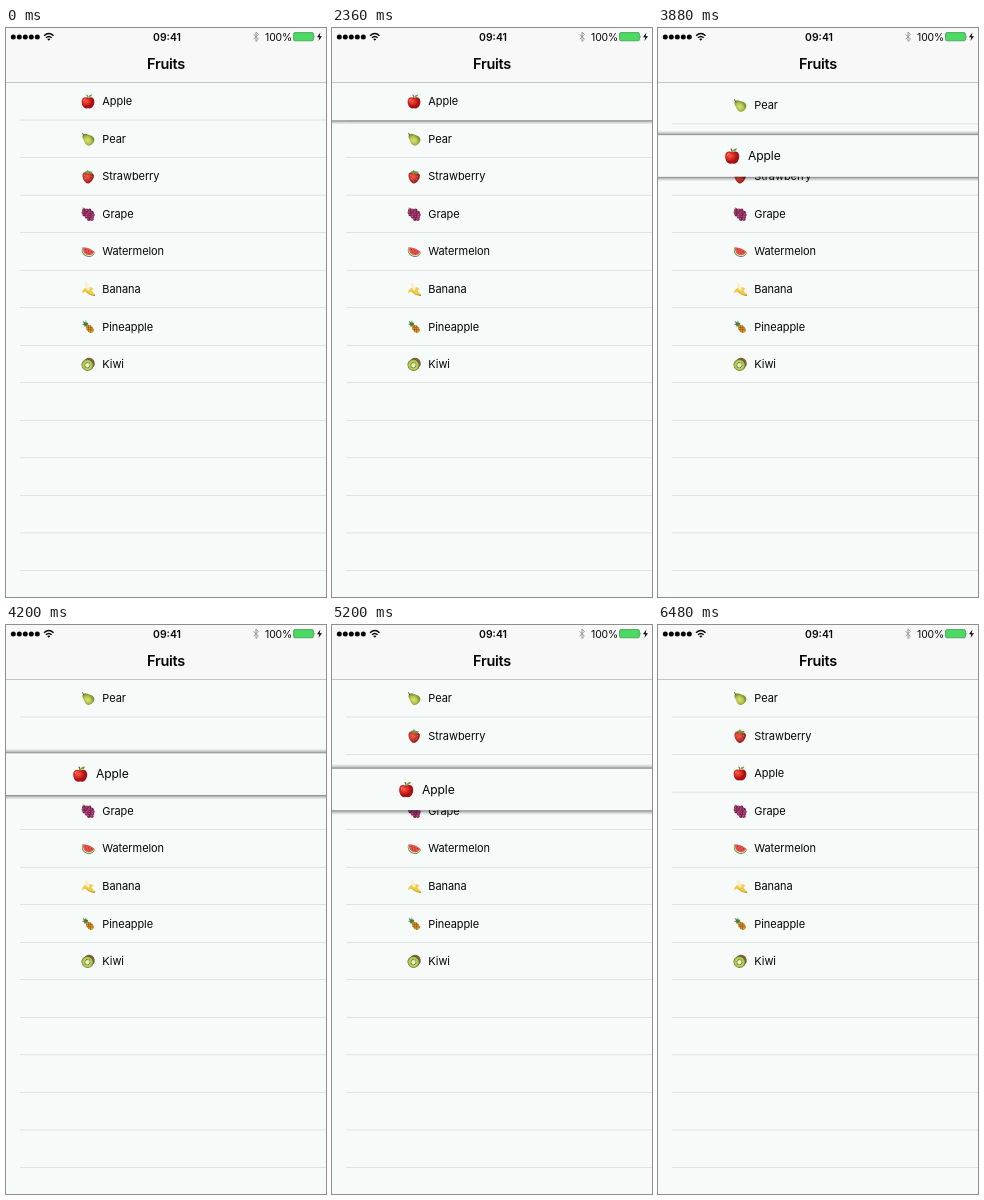
Write an HTML page that moves like this. It is 320 px wide and 569 px high and loops after 6.92 s.

```html
<!DOCTYPE html>
<html lang="en">
<head>
<meta charset="utf-8">
<title>Fruits</title>
<style>
  html, body { margin: 0; width: 100%; height: 100%; overflow: hidden; background: #f6fbfa; }
  svg { display: block; width: 100%; height: 100%; }
  text { font-family: Inter, Roboto, "Liberation Sans", sans-serif; fill: #050505; }
  .label { font-size: 11px; letter-spacing: -.08px; }
  .title { font-size: 14.5px; font-weight: 600; letter-spacing: -.3px; text-anchor: middle; }
  .clock { font-size: 10.4px; font-weight: 600; text-anchor: middle; }
  .charge { font-size: 10.4px; letter-spacing: -.1px; }
</style>
</head>
<body>
<svg viewBox="0 0 320 569">
  <defs>
    <linearGradient id="above" x2="0" y2="1">
      <stop offset="0" stop-opacity="0"/><stop offset=".5" stop-opacity=".17"/><stop offset="1" stop-opacity=".5"/>
    </linearGradient>
    <linearGradient id="below" x2="0" y2="1">
      <stop offset="0" stop-opacity=".5"/><stop offset=".5" stop-opacity=".17"/><stop offset="1" stop-opacity="0"/>
    </linearGradient>
    <radialGradient id="red" cx=".35" cy=".35">
      <stop offset="0" stop-color="#ff5a48"/><stop offset=".55" stop-color="#dc2a22"/><stop offset="1" stop-color="#a31215"/>
    </radialGradient>
    <radialGradient id="berry" cx=".4" cy=".4">
      <stop offset="0" stop-color="#ea5a4c"/><stop offset=".6" stop-color="#cf372f"/><stop offset="1" stop-color="#9c211f"/>
    </radialGradient>
    <radialGradient id="lime" cx=".4" cy=".55">
      <stop offset="0" stop-color="#dbe27a"/><stop offset=".6" stop-color="#b4c44c"/><stop offset="1" stop-color="#7d9230"/>
    </radialGradient>
  </defs>

  <rect width="320" height="569" fill="#f6fbfa"/>
  <g id="lines" fill="#c4c0c4"></g>
  <g id="list"></g>

  <g id="bar">
    <rect width="320" height="54" fill="#f8f8f8"/>
    <rect y="54" width="320" height="1" fill="#c4c4c4"/>
    <g id="signal" fill="#050505"></g>
    <g fill="none" stroke="#050505" stroke-width="1.5">
      <path d="M38.1 7.7Q42.8 3.3 47.5 7.7M40 9.8Q42.8 7.2 45.6 9.8"/>
      <path d="M42.8 12.8L41.2 11Q42.8 9.8 44.4 11Z" fill="#050505" stroke="none"/>
    </g>
    <text class="clock" x="161" y="12.6">09:41</text>
    <path d="M247.6 6.2L252.4 11.2L250 13.5V4L252.4 6.3L247.6 11.3" fill="none" stroke="#8f8f93" stroke-width=".9"/>
    <text class="charge" x="259" y="12.6">100%</text>
    <rect x="287.6" y="4.6" width="19.8" height="8.2" rx="1.3" fill="#4cd964" stroke="#3a9f4c" stroke-width=".8"/>
    <path d="M308.2 7.2q1.5 1.5 0 3z" fill="#3a9f4c"/>
    <path d="M314.4 4.6L311 9.3H313.4L312.4 13L316 8.2H313.6Z" fill="#050505"/>
    <text class="title" x="160" y="41">Fruits</text>
  </g>
</svg>
<script>
const LOOP = 6920, STEP = 40, TOP = 54.6, ROW = 37.54, MID = 160, LIFT = .1;
const $ = id => document.getElementById(id);
const slot = i => TOP + ROW * (i + .5);
const clamp = v => Math.max(0, Math.min(1, v));
const ease = (t, start, span = 300) => {
  const u = clamp((t - start) / span);
  return u * u * (3 - 2 * u);
};

const dot = (x, y, r, fill) => `<circle cx="${x}" cy="${y}" r="${r}" fill="${fill}"/>`;
const oval = (x, y, rx, ry, fill) => `<ellipse cx="${x}" cy="${y}" rx="${rx}" ry="${ry}" fill="${fill}"/>`;
const shape = (d, fill, more = '') => `<path d="${d}" fill="${fill}" ${more}/>`;
const line = (d, color, width) => shape(d, 'none', `stroke="${color}" stroke-width="${width}" stroke-linecap="round"`);
const turn = (deg, art) => `<g transform="rotate(${deg})">${art}</g>`;

function grapes() {
  let out = line('M-2 -4Q-3 -6 -5 -6.2', '#7d8a3a', 1.1);
  [3, 4, 4, 3, 2].forEach((n, r) => {
    for (let i = 0; i < n; i++) {
      const x = (i - (n - 1) / 2) * 2.9 + r * .9 - 1.2, y = r * 2.2 - 3.8;
      out += dot(x, y, 1.8, (i + r) % 2 ? '#9a2c62' : '#74204f') + dot(x - .4, y - .5, .5, '#c87aa2');
    }
  });
  return out;
}

function kiwi() {
  let seeds = '';
  for (let a = 0; a < 6.2; a += Math.PI / 6) {
    seeds += dot((Math.cos(a) * 2.5).toFixed(2), (Math.sin(a) * 2.8).toFixed(2), .42, '#3f4a1c');
  }
  return turn(35, oval(.4, -1.6, 5.6, 5.4, '#80643a') + oval(0, .8, 6, 5.9, '#6d5428')
    + oval(0, 1, 5.5, 5.4, '#9dbf48') + oval(0, 1, 4.4, 4.3, '#b8d265')
    + `<g transform="translate(0 1)">${seeds}${oval(0, 0, 1.8, 2, '#f1f3d2')}</g>`);
}

const fruits = [
  ['Apple', shape('M0 -3.4C2 -5 6.4 -4.6 6.4 .2C6.4 4 3.8 7 1.8 6.8Q0 6.3 -1.8 6.8C-3.8 7 -6.4 4 -6.4 .2C-6.4 -4.6 -2 -5 0 -3.4Z', 'url(#red)')
    + line('M0 -3Q0 -5.5 -1 -6.6', '#6a3d1c', 1) + shape('M.2 -4.4Q1 -7.4 4.4 -7Q3.6 -4.2 .2 -4.4Z', '#69a63a')
    + shape('M-4.6 -1.4Q-4 -3.2 -2.4 -3Q-4 -1.8 -4.2 .2Z', '#ff9c8c')],
  ['Pear', turn(-48, shape('M0 -6.4C2.8 -6.4 3 -3.4 4.2 -1.2C6.6 3 4.4 6.4 0 6.4S-6.6 3 -4.2 -1.2C-3 -3.4 -2.8 -6.4 0 -6.4Z', 'url(#lime)')
    + line('M0 -6L.8 -8', '#6a4a22', .9))],
  ['Strawberry', turn(8, shape('M-5.4 -3C-1.6 -5.4 4 -5.2 5.6 -2.4C6.6 1.6 3.6 6 1 6.8C-2.6 6.8 -7 1 -5.4 -3Z', 'url(#berry)')
    + shape('M-5.2 -3.8L-2 -5.4L-1.6 -6.6L.6 -5.6L4.2 -5.6L3 -4L3.6 -2.6L.8 -3.6L-1 -2.2L-2 -3.6Z', '#6f9a45')
    + [[-3.4, -.8], [-2, 2], [.4, .4], [3.2, -.8], [2.6, 2.4], [.5, 4.4]].map(p => dot(...p, .42, '#f0b67c')).join(''))],
  ['Grape', grapes()],
  ['Watermelon', turn(22, shape('M-7 -2H7C6.6 2.8 3.6 5 0 5S-6.6 2.8 -7 -2Z', '#4f8a4a')
    + shape('M-6.5 -2.2H6.5C6 2.2 3.2 4.1 0 4.1S-6 2.2 -6.5 -2.2Z', '#e6ecc4')
    + shape('M-6 -2.4Q0 -4.4 6 -2.4C5.4 1.6 2.9 3.2 0 3.2S-5.4 1.6 -6 -2.4Z', '#e6524c')
    + [[-3, -1.2], [0, -1], [3, -1.2], [-1.4, 1], [1.5, 1]].map(p => dot(...p, .42, '#4a211d')).join(''))],
  ['Banana', shape('M-3.4 -6Q-2 -7.2 -.8 -5.8Q1.4 -2.6 2.2 1.4L-.8 2.4Q-3.2 -2 -3.4 -6Z', '#faf0cc')
    + shape('M-2.6 -1.4Q-5.8 .4 -6.4 4Q-4.2 2.4 -2 2.8Q.8 6.4 5.6 6.6L6.8 5.2Q4.4 3.4 3.4 .6Q4.4 -.4 5.8 0Q4 -2.6 1.4 -2Q2 .4 1 1.6Q-1 1 -2.6 -1.4Z', '#f0cb4a')
    + line('M-1.6 2.6Q1.2 5.6 5.2 6', '#cf9f2c', .8) + dot(6.2, 5.9, .7, '#6b5121')],
  ['Pineapple', turn(-42, shape('M0 -.6L-3 -3L-1.6 -3.6L-2.8 -6.4L-.9 -5L0 -8.2L.9 -5L2.8 -6.4L1.6 -3.6L3 -3Z', '#4f7f3c')
    + oval(0, 2.8, 3.1, 4.6, '#d9982f')
    + line('M-2.6 1L2 6M-1.4 -.8L2.8 4M2.6 1L-2 6M1.4 -.8L-2.8 4', '#94591b', .6))],
  ['Kiwi', kiwi()]
];

$('signal').innerHTML = Array.from({length: 5}, (_, i) => dot(7.3 + i * 6, 9, 2.5, '#050505')).join('');

const sepY = k => TOP + ROW * k - .35;
const sep = y => `<rect x="14" y="${y}" width="306" height=".45"/>`;
for (let k = 4; k <= 13; k++) $('lines').innerHTML += sep(sepY(k));

const rows = fruits.map(([name, art], i) => {
  const g = document.createElementNS('http://www.w3.org/2000/svg', 'g');
  const h = ROW / 2;
  const plate = i ? '' : `<g class="plate">
    <rect x="-160" y="${-h - 4.4}" width="320" height="4.4" fill="url(#above)"/>
    <rect x="-160" y="${h}" width="320" height="4.4" fill="url(#below)"/>
    <rect x="-160" y="${-h}" width="320" height="${ROW}" fill="#f6fbfa"/></g>`;
  g.innerHTML = `${plate}<g transform="translate(-78 .2)">${art}</g>
    <text class="label" x="-63.7" y="3.9">${name}</text>`;
  return g;
});
[...rows.slice(1), rows[0]].forEach(g => $('list').append(g));

// separators that travel with the first three rows
const rules = [0, 1, 2].map(() => {
  $('lines').insertAdjacentHTML('beforeend', sep(0));
  return $('lines').lastElementChild;
});
const plate = rows[0].querySelector('.plate');

// time, centre, speed (px per ms)
const drag = [[2980, 73.4, 0], [3320, 87.5, .061], [3880, 128, .06], [4600, 164.5, 0]];
function dragY(t) {
  if (t <= drag[0][0]) return drag[0][1];
  const i = drag.findIndex(p => p[0] > t);
  if (i < 0) return drag[3][1];
  const [t0, y0, v0] = drag[i - 1], [t1, y1, v1] = drag[i];
  const d = t1 - t0, u = (t - t0) / d, w = 1 - u;
  return y0 * w * w * (1 + 2 * u) + y1 * u * u * (3 - 2 * u) + d * u * w * (v0 * w - v1 * u);
}

const place = (g, y, s = 1) => g.setAttribute('transform', `translate(${MID} ${y}) scale(${s})`);

function draw(t) {
  const swap1 = ease(t, 3640), swap2 = ease(t, 4270), drop = ease(t, 5329);
  const held = t >= 2360 && t < 5680;
  const pos = [swap1 + swap2, 1 - swap1, 2 - swap2];

  rows.forEach((g, i) => { if (i) place(g, slot(pos[i] ?? i)); });
  const y = dragY(t);
  place(rows[0], y + (slot(2) - y) * drop, 1 + LIFT * ease(t, 2380) * (1 - drop));
  plate.setAttribute('visibility', held ? 'visible' : 'hidden');
  rules.forEach((r, i) => r.setAttribute('y', sepY(pos[i] + 1)));
}

const begin = performance.now();
function tick() {
  const t = (performance.now() - begin) % LOOP;
  draw(Math.floor(t / STEP) * STEP);
  requestAnimationFrame(tick);
}
tick();
</script>
</body>
</html>
```
